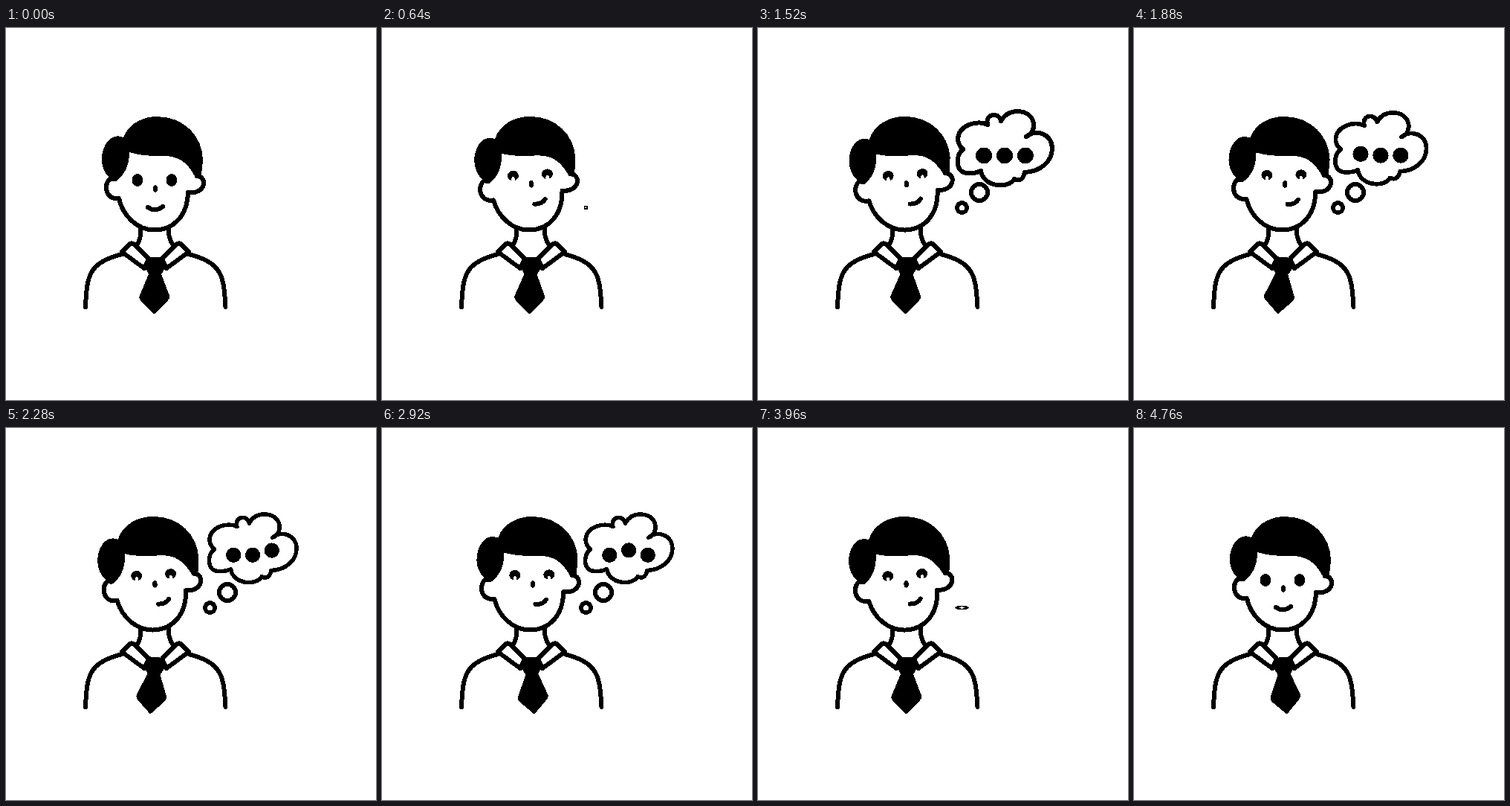
Recreate the animation shown at these times as an HTML page. Size 498 px wide and 500 px high, loop 4800 ms.

```html
<!DOCTYPE html>
<html>
<head>
<meta charset="utf-8">
<style>
html, body { margin: 0; width: 100%; height: 100%; overflow: hidden; background: #fff; }
svg { display: block; width: 100vw; height: 100vh; shape-rendering: crispEdges; }
.line { fill: none; stroke: #000; stroke-width: 6; stroke-linecap: round; stroke-linejoin: round; }
.white { fill: #fff; }
</style>
</head>
<body>
<svg viewBox="0 0 498 500">
  <g class="line">
    <path d="M107 375C109 332 111 316 156 304M295.500 375C293 332 291 316 246 304"/>
    <path d="M181 270Q182 284 176 292M219 270Q218 282 225 292"/>
    <path class="white" d="M156 301L167 290Q171 288 175 293L192 310L186 323Z"/>
    <path class="white" d="M246 301L235 290Q231 288 227 293L210 310L216 323Z"/>
  </g>
  <path id="tie" stroke="#000" stroke-width="2" stroke-linejoin="round"
    d="M191 309H210L215 319L208 331L219.500 361Q219 364 216 367L200 383.500L183 367Q180 364 180.500 361L193 331L187 319Z"/>
  <g id="head">
    <path class="line white" d="M145 201C130 203 131 232 152 229C157 252 176 271.500 200 271.500C224 271.500 244 254 245 221C270 224 271 199 257 199"/>
    <path d="M158 147C166 126 188 119 203 119C240 119 265 146 265 178L263 197Q260 204 254 199C242 178 231 171 206 172Q182 172 166 167C166 181 162 196 148 206Q141 208 138 200C126 188 126 166 137 152Q146 142 158 147Z"/>
    <g id="features">
      <g id="eyes"></g>
      <ellipse cx="201" cy="216" rx="3.200" ry="4.800"/>
    </g>
    <path id="mouth" class="line"/>
  </g>
  <g id="cloud">
    <path class="line white" d="M309 130C296 123 270 130 269 149Q269 157 276 163C264 172 266 196 283 195Q292 196 300 192C303 214 337 217 345 203Q356 208 359 194C382 193 396 178 396 162C396 142 374 135 361 146C377 140 375 112 349 112Q334 112 327 125C324 112 305 115 309 130Z"/>
    <g id="dots"><circle cx="304" cy="171.500" r="11"/><circle cx="332" cy="171.500" r="11"/><circle cx="360" cy="171.500" r="11"/></g>
  </g>
  <circle id="medium" class="line white" cx="298" cy="221" r="11"/>
  <circle id="small" class="line white" cx="274.500" cy="241.500" r="6.500"/>
</svg>
<script>
const LOOP = 4800;
const $ = id => document.getElementById(id);
const clamp = v => Math.min(1, Math.max(0, v));
const span = (t, from, to) => clamp((t - from) / (to - from));
const smooth = p => (1 - Math.cos(Math.PI * p)) / 2;
const mix = (a, b, p) => a + (b - a) * p;
const backIn = p => p * p * (2.7 * p - 1.7);
const rotate = (el, deg, x, y) => el.setAttribute('transform', `rotate(${deg} ${x} ${y})`);

const mouthRest = [191, 241, 201, 248, 211, 240];
const mouthSmirk = [207, 237, 217, 238, 221.5, 231];

// Grow past full size, settle, then flatten vertically.
function pop(el, t, x, y, { start, peak, settle, over, base = 1, exit }) {
  const grow = over * Math.sin(span(t, start, peak) * Math.PI / 2);
  const scale = base * (t < peak ? grow : mix(over, 1, span(t, peak, settle)));
  const flat = 1 - backIn(span(t, exit, exit + 195));
  el.style.display = scale > 0.01 && flat > 0.01 ? '' : 'none';
  el.setAttribute('transform',
    `translate(${x} ${y}) scale(${scale} ${scale * flat}) translate(${-x} ${-y})`);
}

function drawFace(t) {
  const u = smooth(span(t, 400, 560)) - smooth(span(t, 4400, 4560));
  $('features').setAttribute('transform', `translate(${3 * u} ${-6 * u})`);
  $('eyes').innerHTML = [177, 223].map(x =>
    `<ellipse cx="${x}" cy="${204.5 - u}" rx="7.500" ry="${8.5 - 1.7 * u}"/>` +
    `<ellipse class="white" cx="${x}" cy="${211 - u}" rx="${2.4 * u}" ry="${5 * u}"/>`).join('');
  const [a, b, c, d, e, f] = mouthRest.map((v, i) => mix(v, mouthSmirk[i], u));
  $('mouth').setAttribute('d', `M${a} ${b}Q${c} ${d} ${e} ${f}`);
}

function draw(t) {
  const sway = t > 400 && t < 4400 ? smooth((t - 400) / 400) : 0;
  rotate($('head'), -4.3 * sway, 199, 270);
  rotate($('tie'), 5 * Math.sin(t / 440 * 2 * Math.PI), 201, 311);
  drawFace(t);

  pop($('small'), t, 274.5, 241.5, { start: 600, peak: 900, settle: 1240, over: 1.35, exit: 3780 });
  pop($('medium'), t, 298, 221, { start: 850, peak: 1150, settle: 1490, over: 1.35, exit: 3560 });
  pop($('cloud'), t, 332.5, 162.5, { start: 1060, peak: 1480, settle: 2300, over: 1.09, base: 0.92, exit: 3330 });
  [...$('dots').children].forEach((dot, i) => {
    const local = t - 1860 - 160 * i;
    const hop = local > 0 ? Math.sin(Math.PI * clamp(local % 780 / 240)) : 0;
    dot.setAttribute('cy', 171.5 - 7 * hop);
  });
}

function tick() {
  draw(performance.now() % LOOP);
  requestAnimationFrame(tick);
}
tick();
</script>
</body>
</html>
```
